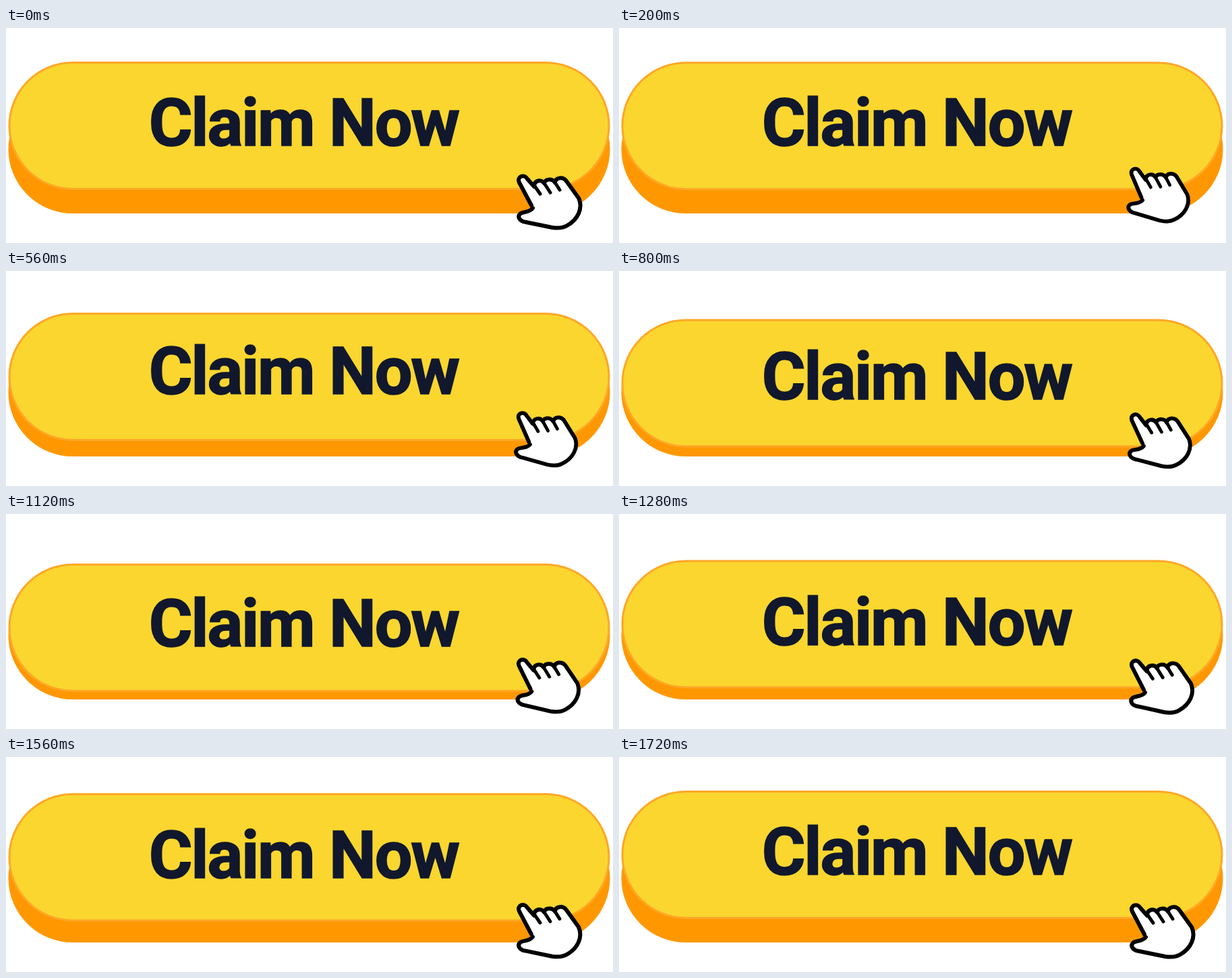
An HTML page for the animation above (2 s loop, 900 by 320 pixels).

```html
<!DOCTYPE html>
<html lang="en">
<head>
<meta charset="utf-8">
<title>Claim Now button</title>
<style>
  html, body { margin: 0; width: 100%; height: 100%; overflow: hidden; background: #fff; }
  svg { display: block; width: 900px; height: 320px; }
  text {
    font: 700 99px Roboto, sans-serif;
    letter-spacing: -2.25px;
    fill: #11182d;
    stroke: #11182d;
    stroke-width: 1.5;
  }
  #hand { stroke: #000; stroke-width: 6; stroke-linecap: round; stroke-linejoin: round; }
</style>
</head>
<body>
<svg viewBox="0 0 900 320">
  <rect x="3.5" y="85" width="892" height="191" rx="95.5" fill="#ff9800"/>
  <rect id="face" x="5" y="51.5" width="889" height="188" rx="94" fill="#fad62f" stroke="#ffa726" stroke-width="3"/>
  <text id="label" x="211.7" y="175.2">Claim Now</text>
  <g id="hand">
    <path fill="#fff" d="M779 264 L761 230 C757 221 768 217 772.5 224 L783 236
      C783 226 794 225 798 231 C800 224 810 224 814 230 C815 222 826 221 831 228
      L849 253 C856 268 848 285 832 294 Q824 299 810 297 L771 289
      C762 288 757 281 763 276 C767 273 776 275 781 268"/>
    <path fill="none" stroke-width="5" d="M783 234 L792 247 M798 231 L807 245 M814 230 L821 241"/>
  </g>
</svg>
<script>
  const LOOP = 2000, STEP = 40, LAST = 1720;
  const [face, label, hand] = ["face", "label", "hand"].map(id => document.getElementById(id));

  // Eased progress from 0 to 1 between two times.
  function ease(t, start, end) {
    const p = Math.min(1, Math.max(0, (t - start) / (end - start)));
    return p * p * (3 - 2 * p);
  }

  const moveDown = (el, y) => el.setAttribute("transform", `translate(0 ${y})`);

  function draw(now) {
    const t = Math.min(LAST, Math.floor(now % LOOP / STEP) * STEP);
    moveDown(face, 24 * (ease(t, 160, 960) - ease(t, 1080, LAST)));
    moveDown(label, 22 * (ease(t, 160, 1160) - ease(t, 1160, LAST)));

    const lift = ease(t, 0, 160) - ease(t, 160, LAST);
    hand.setAttribute("transform",
      `translate(766 ${218 - 10.8 * lift}) rotate(${5 * lift}) scale(${1 - 0.04 * lift}) translate(-766 -218)`);
  }

  const begin = performance.now();
  function tick() {
    draw(performance.now() - begin);
    requestAnimationFrame(tick);
  }
  tick();
</script>
</body>
</html>
```
